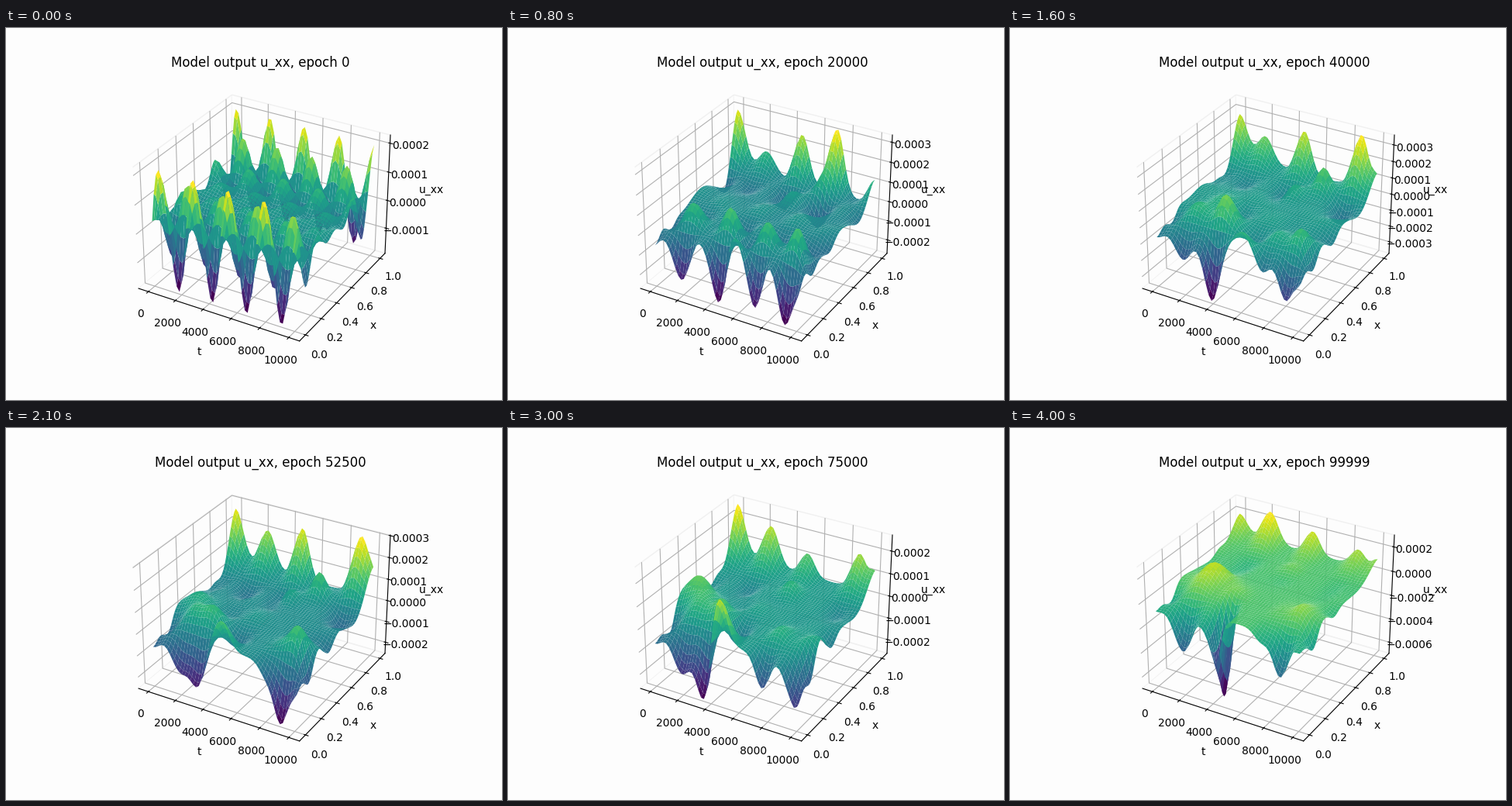
A matplotlib script for the animation above (4.1 s loop, 640 px wide and 480 px high).

```python
import numpy as np
import matplotlib.pyplot as plt
from matplotlib.animation import FuncAnimation
from matplotlib.ticker import MultipleLocator

FRAMES, STEP_MS = 41, 100
EPOCH_STEP, LAST_EPOCH = 2500, 99999
PAPER = "#fdfdfd"
LEVEL = 0.2   # height of the calm middle of the sheet
REACH = 0.25  # how far an edge wave reaches into the sheet
FADE = 4      # frames over which the first regular wave dies out

# t is in thousands, heights are in units of 1e-4
t = np.linspace(0, 10, 50)
x = np.linspace(0, 1, 50)
T, X = np.meshgrid(t, x)

# z axis limits through the training
LIMIT_KEYS = [0, 8, 16, 21, 30, 36, 40]
LOW = [-1.92, -2.71, -3.74, -2.54, -2.64, -6.45, -6.96]
HIGH = [2.28, 3.36, 3.59, 3.03, 2.70, 3.03, 2.96]

# A feature is (centre in t, width, height); a list holds its values at KEYS.
KEYS = [8, 16, 21, 30, 36]
FRONT = [
    (0, .8, -.8),
    (1.9, .9, [-1.9, -1.6, -1.5, -1.7, -3.2]),
    ([4.65, 3.9, 3.2, 3.5, 4], .75, [-2.8, -3.4, -1.8, -2.6, -2]),
    ([5.5, 6.1, 4.9, 4.6, 4.6], .75, [1.1, .9, 1.2, 2.1, 0]),
    ([7.15, 7.5, 8, 7.6, 7.4], .65, [-2.3, -1, -.6, -1.3, -.8]),
    ([9.2, 9.1, 9.05, 9.6, 8.7], .7, [-2.5, -2.1, -2.4, -1.2, -2.9]),
    (10, .4, -.7),
]
BACK = [
    (0, .8, [2.8, 2.5, 2.4, 2.4, 1.7]),
    ([2, 1.9, 2.4, 2.5, 2.3], .8, [1, 1.6, 1.8, 1.8, 2.5]),
    ([4.75, 4.8, 4.95, 5.2, 5.4], .7, [2.4, 2.5, 2.3, 1, 1.8]),
    ([7.25, 8.85, 9.1, 8.9, 8.65], .7, [3.2, 3.2, 2.6, 1.6, 1.3]),
    (10, .5, .9),
]
# Inner features are (t, x, width in t, width in x, height).
INNER = [
    ([2.5, 2.5, 1.2, 1, 2.2], .37, 1.1, .1, [.3, .8, .7, 1.1, 1.2]),
    (4.3, .1, .4, .09, [0, 0, 0, 0, -5.5]),
    (7, .85, .6, .07, [1.4, 1.4, 1.1, 0, 0]),
    (5.4, .73, .7, .08, .8),
    (0, .17, .9, .08, -1.1),
    (0, .74, .6, .08, .5),
    (10, .17, .5, .08, -1.5),
    (10, .42, .6, .08, -.5),
]


def at(frame, value):
    values = np.atleast_1d(value)
    return np.interp(frame, KEYS[:len(values)], values)


def bell(v, centre, width):
    return np.exp(-((v - centre) / width) ** 2)


def ripple(dist, period):
    return np.exp(-(dist / REACH) ** 1.5) * np.cos(2 * np.pi * dist / period)


def edge(frame, features, height, crest, period):
    """A regular wave gives way to the learned features."""
    old = np.exp(-frame / FADE)
    wave = height * np.cos(2 * np.pi * (t - crest) / period)
    learned = sum(at(frame, h) * bell(t, at(frame, c), w) for c, w, h in features)
    return old * wave + (1 - old) * learned


def heights(frame, low, high):
    done = frame / (FRAMES - 1)
    z = (LEVEL
         + edge(frame, FRONT, 1.65, .58, 2.43) * ripple(X, .28 + .32 * done)
         + edge(frame, BACK, 1.5, .05, 2.5) * ripple(1 - X, .28 + .5 * done ** .5))
    grown = 1 - np.exp(-frame / FADE)
    for c, cx, w, wx, h in INNER:
        z += grown * at(frame, h) * bell(T, at(frame, c), w) * bell(X, cx, wx)
    # crests and troughs fill the z axis up to a small margin
    margin = (high - low) / 50
    return np.where(z > 0, z * (high - margin) / z.max(), z * (low + margin) / z.min())


fig = plt.figure(figsize=(6.4, 4.8), dpi=100, facecolor=PAPER)
ax = fig.add_subplot(111, projection="3d", facecolor=PAPER)
ax.set(xlabel="t", ylabel="x", zlabel="u_xx")
for axis in (ax.xaxis, ax.yaxis, ax.zaxis):
    axis.pane.set_alpha(1)
    axis.pane.set_facecolor(PAPER)
    axis.pane.set_edgecolor("#f0f0f0")

PAD = 5.5 * 25 / 24 - 5
surface = None


def draw(frame):
    global surface
    low = np.interp(frame, LIMIT_KEYS, LOW)
    high = np.interp(frame, LIMIT_KEYS, HIGH)
    if surface is not None:
        surface.remove()
    surface = ax.plot_surface(T * 1000, X, heights(frame, low, high) * 1e-4,
                              cmap="viridis")
    ax.set_xlim(-1000 * PAD, 10000 + 1000 * PAD)
    ax.set_ylim(-PAD / 10, 1 + PAD / 10)
    ax.set_zlim(low * 1e-4, high * 1e-4)
    ax.xaxis.set_major_locator(MultipleLocator(2000))
    ax.yaxis.set_major_locator(MultipleLocator(0.2))
    ax.zaxis.set_major_locator(MultipleLocator(1e-4 if high - low < 8 else 2e-4))
    epoch = min(frame * EPOCH_STEP, LAST_EPOCH)
    ax.set_title(f"Model output u_xx, epoch {epoch}")
    return []


anim = FuncAnimation(fig, draw, frames=FRAMES, interval=STEP_MS, repeat=True)
plt.show()
```
